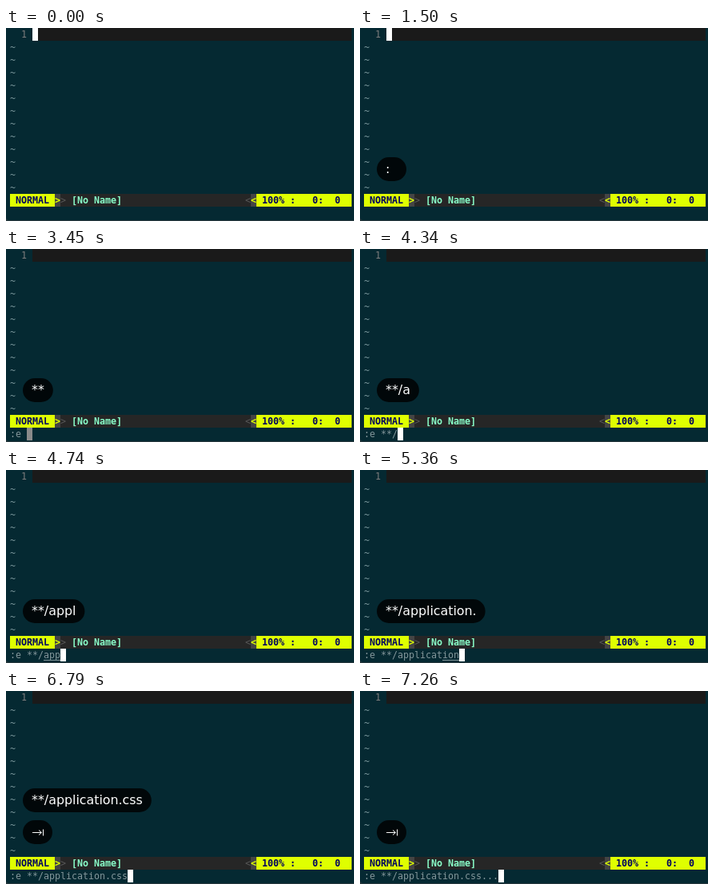
An HTML page with a canvas that plays this animation: 435x242 px, repeating every 8 s.

```html
<!DOCTYPE html>
<html lang="en">
<head>
<meta charset="utf-8">
<title>Opening a file in the editor</title>
<style>
html, body { margin: 0; height: 100%; overflow: hidden; background: #052932; }
canvas { display: block; }
</style>
</head>
<body>
<canvas id="stage" width="435" height="242"></canvas>
<script>
const ctx = document.getElementById('stage').getContext('2d');
const LOOP = 8000, LEFT = 5, CELL = 7, ROW = 16;
const CONFIRM = 290; // delay until a predicted character loses its underline
const FADE = 230;
const MONO = '11.63px "DejaVu Sans Mono", monospace';
const SANS = '15.85px "DejaVu Sans", sans-serif';

// Each key: character, time in the key bubble, time on the command line.
const keys = [
  ['*', 3390, 3560], ['*', 3450, 3620], ['/', 3800, 3800],
  ['a', 4340, 4460], ['p', 4560, 4600], ['p', 4650, 4690],
  ['l', 4740, 4790], ['i', 4830, 4870], ['c', 4890, 4930],
  ['a', 4950, 4980], ['t', 5000, 5050], ['i', 5060, 5130],
  ['o', 5130, 5190], ['n', 5190, 5240], ['.', 5360, 5420],
  ['c', 5450, 5490], ['s', 5620, 5670], ['s', 5730, 5780]
];
const opening = [[':', 1500, 1790], ['e', 1680, 1970], ['␣', 1790, 2080]];

const typed = (list, t, at) => list.filter(k => t >= k[at]).map(k => k[0]).join('');
const colX = col => LEFT + col * CELL;

function rect(x, y, w, h, color) {
  ctx.fillStyle = color;
  ctx.fillRect(x, y, w, h);
}

function cells(text, col, row, color, back, weight = 'normal') {
  if (back) rect(colX(col), row * ROW, text.length * CELL, ROW, back);
  ctx.font = weight + ' ' + MONO;
  ctx.fillStyle = color;
  ctx.fillText(text, colX(col), row * ROW + 12);
}

function cursor(col, row, color) {
  rect(colX(col), row * ROW, CELL, ROW, color);
}

function line(...points) {
  ctx.beginPath();
  for (const [x, y] of points) ctx.lineTo(x, y);
  ctx.stroke();
}

function bubble(text, y = 162, alpha = 1) {
  if (!text || alpha <= 0) return;
  const hasSpace = text.endsWith('␣'), isTab = text === '⇥';
  const label = text.replace(/[␣⇥]/, '');
  ctx.save();
  ctx.globalAlpha = alpha;
  ctx.font = SANS;
  const labelW = ctx.measureText(label).width;
  const w = Math.max(37, 22 + labelW + (hasSpace ? 4 : 0));
  ctx.fillStyle = 'rgba(0,0,0,.82)';
  ctx.beginPath();
  ctx.roundRect(21, y, w, 30, 15);
  ctx.fill();
  ctx.fillStyle = ctx.strokeStyle = '#fff';
  ctx.lineWidth = 1;
  ctx.fillText(label, 32, y + 20);
  if (hasSpace) {
    const x = Math.round(32 + labelW) - .5;
    line([x, y + 21], [x, y + 23.5], [x + 4, y + 23.5], [x + 4, y + 21]);
  }
  if (isTab) {
    line([33, y + 15.5], [44, y + 15.5]);
    line([41, y + 12.5], [44.5, y + 15.5], [41, y + 18.5]);
    line([46.5, y + 11.5], [46.5, y + 19.5]);
  }
  ctx.restore();
}

function editor() {
  rect(0, 0, 435, 242, '#26373c');
  ctx.fillStyle = '#052932';
  ctx.beginPath();
  ctx.roundRect(0, -10, 440, 251, 4);
  ctx.fill();
  rect(33, 0, 399, ROW, '#1a1a1a');
  cells('1', 2, 0, '#7c7c7c');
  for (let row = 1; row <= 12; row++) cells('~', 0, row, '#7b979c');

  rect(LEFT, 208, 427, ROW, '#262626');
  cells(' NORMAL ', 0, 13, '#00005f', '#dfff00', 'bold');
  cells('>', 8, 13, '#dfff00', '#444', 'bold');
  cells('>', 9, 13, '#585858');
  cells('[No Name]', 11, 13, '#8affca', null, 'bold');
  cells('<', 42, 13, '#585858');
  cells('<', 43, 13, '#dfff00', '#444', 'bold');
  cells(' 100% :   0:  0  ', 44, 13, '#00005f', '#dfff00', 'bold');
}

function commandLine(t) {
  if (t < 1730) return cursor(4, 0, '#fff');
  const text = typed(opening, t, 2).replace('␣', ' ') +
    typed(keys, t, 2) + (t >= 7080 ? '...' : '');
  cells(text, 0, 14, '#84979b');
  keys.forEach(([, , shown], i) => {
    const hold = i === 0 ? 60 : i === 1 ? 180 : CONFIRM;
    if (t >= shown && t < shown + hold) rect(colX(3 + i), 238, CELL, 1, '#84979b');
  });
  cursor(Math.max(1, text.length), 14, t < 3560 ? '#8a8a8a' : '#fff');
}

function bubbles(t) {
  const fade = start => Math.min(1, 1 - (t - start) / FADE);
  if (t < 3390) return bubble(typed(opening, t, 1), 162, fade(3040));
  const path = typed(keys, t, 1);
  if (t < 6790) return bubble(path);
  bubble(path, 122, fade(7030));
  bubble('⇥');
}

function draw(now) {
  const t = now % LOOP;
  editor();
  commandLine(t);
  bubbles(t);
}

let start;
function tick(now) {
  start ??= now;
  draw(now - start);
  requestAnimationFrame(tick);
}
draw(0);
requestAnimationFrame(tick);
</script>
</body>
</html>
```
